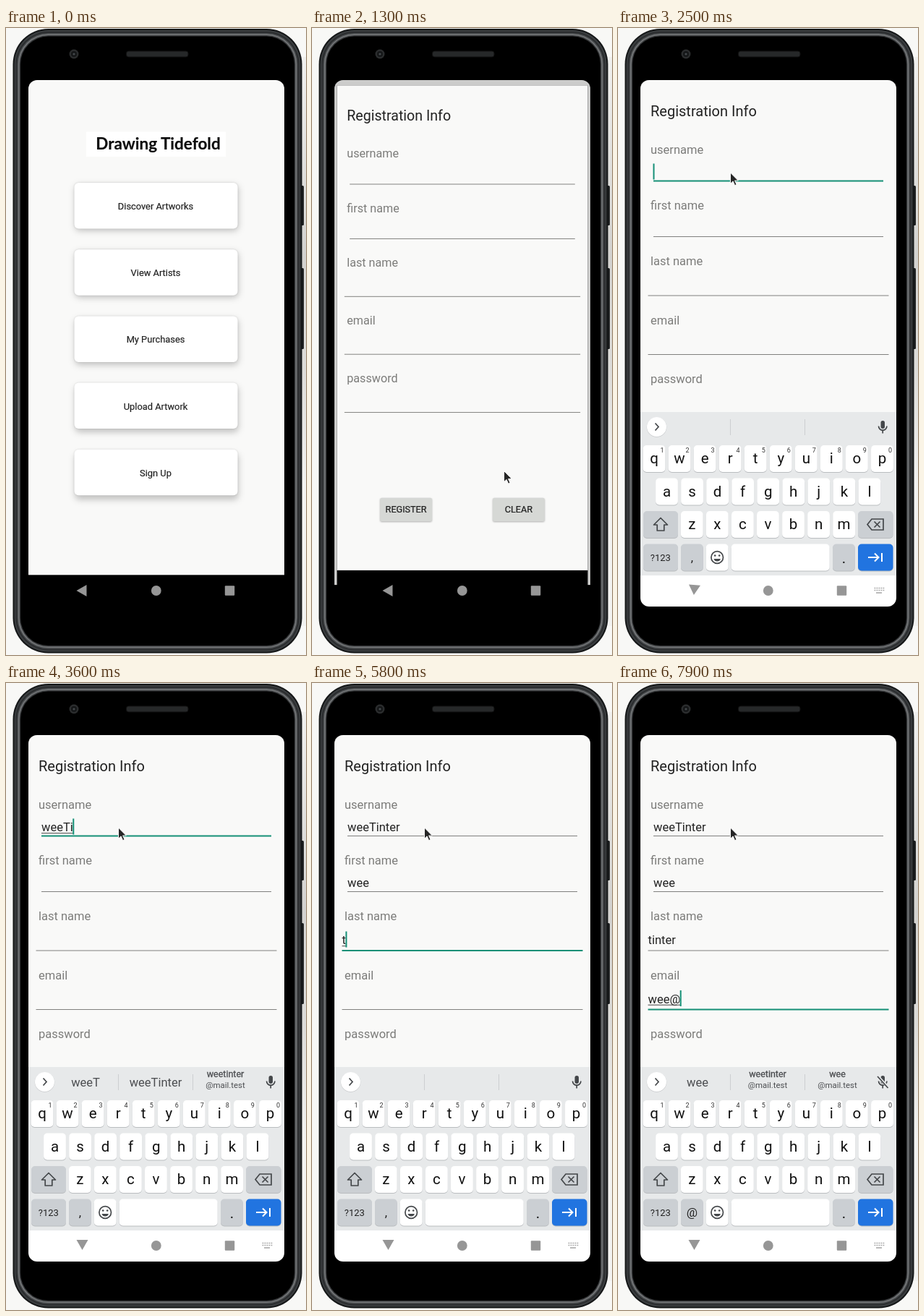
An HTML page that plays this animation: 415 by 867 pixels, repeating every 8 s.

```html
<!DOCTYPE html>
<html lang="en">
<head>
<meta charset="utf-8">
<title>Sign up</title>
<style>
html, body { margin: 0; width: 100%; height: 100%; overflow: hidden; background: #f8f8f6; }
svg { display: block; width: 415px; height: 867px; }
text { font-family: Roboto, Arial, sans-serif; fill: #222; }
.mid { text-anchor: middle; }
.menu text { font-size: 12.85px; stroke: #222; stroke-width: .2; }
.menu .brand { font: 700 22.5px Lato, sans-serif; fill: #0b0b0b; }
.card { fill: #fff; filter: drop-shadow(1px var(--drop) 5px rgba(0,0,0,.2)) drop-shadow(0 0 1px rgba(0,0,0,.14)); }
.btn { fill: #d6d8d5; filter: drop-shadow(0 1px 1px rgba(0,0,0,.3)); }
.cap { font-size: 12.9px; stroke: #222; stroke-width: .25; }
.head { font-size: 20px; }
.label { font-size: 16.5px; fill: #7c7c7a; }
.typed { font-size: 16.5px; }
.key { font-size: 20.5px; fill: #111; }
.num { font-size: 9px; fill: #333; }
.sug { font-size: 16.5px; fill: #4b4d50; }
.sug .name { font-size: 12.5px; stroke: #4b4d50; stroke-width: .3; }
.sug .host { font-size: 11.4px; }
.icon { fill: none; stroke: #44474a; stroke-width: 1.7; }
</style>
</head>
<body>
<svg viewBox="0 0 415 867" id="stage"></svg>
<script>
const GREEN = '#159077';
const rect = (x, y, w, h, r, fill, more = '') =>
  `<rect x="${x}" y="${y}" width="${w}" height="${h}" rx="${r}" fill="${fill}" ${more}/>`;
const text = (x, y, s, cls, more = '') => `<text x="${x}" y="${y}" class="${cls}" ${more}>${s}</text>`;
const path = (d, more = 'class="icon"') => `<path d="${d}" ${more}/>`;

// Form fields: label, label baseline, line left, line right, line y
const fields = [
  ['username', 174, 49, 367, 211.5],
  ['first name', 251, 49, 367, 288.5],
  ['last name', 328, 41.5, 374.5, 370],
  ['email', 409.5, 41.5, 374.5, 451.5],
  ['password', 491, 41.5, 374.5, 533.5]
];

// Body outline shrunk by d pixels on each side
const shell = (d, fill) => rect(9.5 + d, 1 + d, 400 - 2 * d, 863.5 - 2 * d, 49 - d, fill);

function phone() {
  return `<defs>
    <linearGradient id="side" x1="0" x2="0" y1="0" y2="1">
      <stop offset="0" stop-color="#f1f1ef"/><stop offset=".35" stop-color="#d3d2cf"/>
      <stop offset=".55" stop-color="#dddcd9"/><stop offset=".75" stop-color="#f3f3f1"/>
    </linearGradient>
    <clipPath id="screen"><rect x="31" y="72" width="354" height="728" rx="12"/></clipPath></defs>`
    + rect(0, 0, 415, 867, 0, '#f8f8f6') + rect(404, 40, 11, 787, 0, 'url(#side)')
    + rect(406, 218, 6, 55, 1.5, '#1d1f20') + rect(406, 332, 6, 112, 1.5, '#1d1f20')
    + shell(0, '#141617') + shell(2, '#3a3d3f') + shell(4, '#2a2c2e') + shell(6, '#4c4f51')
    + shell(7.5, '#77797b') + shell(9, '#3a3c3e') + shell(10.5, '#000')
    + '<circle cx="94" cy="36" r="6.5" fill="#2b2d2e"/><circle cx="94" cy="36" r="4" fill="#151718"/><circle cx="94" cy="36" r="1.6" fill="#45494c"/>'
    + rect(166.5, 32, 85.5, 8, 3, '#262829', 'stroke="#111"');
}

function menu() {
  const items = ['Discover Artworks', 'View Artists', 'My Purchases', 'Upload Artwork', 'Sign Up'];
  return '<g id="menu" class="menu">' + rect(31, 72, 354, 684.3, 0, '#f9f9f8')
    + rect(111, 143.5, 193, 34.5, 0, '#fff') + text(210.5, 168, 'Drawing Tidefold', 'brand mid')
    + items.map((s, i) => rect(94.5, 214 + i * 92.2, 226, 63.5, 6, '#fff', `class="card" style="--drop:${3 + i * .8}px"`)
      + text(207, 251 + i * 92.2, s, 'mid')).join('')
    + rect(31, 72, 354, 684.3, 0, '#000', 'id="scrim"') + '</g>';
}

function form() {
  return '<g id="form">' + rect(31, 72, 354, 728, 0, '#000') + rect(31, 72, 354, 684.3, 0, '#f9f9f8')
    + text(45, 122, 'Registration Info', 'head')
    + fields.map(([name, y, l, r, ly], i) => text(45, y, name, 'label')
      + `<path id="line${i}" d="M${l} ${ly}H${r}"/>` + text(l, ly - 6.3 - (i > 1) * 2.5, '', 'typed', `id="in${i}"`)).join('')
    + rect(0, 0, 0, 1, 0, '#444', 'id="under"') + rect(0, 0, 2, 22, 0, GREEN, 'id="caret"')
    + rect(92, 654, 73, 33, 2, '', 'class="btn"') + rect(251, 654, 73, 33, 2, '', 'class="btn"')
    + text(128.5, 675.2, 'REGISTER', 'cap mid') + text(287.5, 675.2, 'CLEAR', 'cap mid') + '</g>';
}

function key(x, y, w, fill = '#fff') {
  return rect(x, y + 1, w, 37, 5, '#babdc0') + rect(x, y, w, 37, 5, fill);
}
function keyRow(chars, x, y, nums) {
  return [...chars].map((c, i) => {
    const cx = x + i * 35.05;
    return key(cx - 15.4, y, 30.8) + text(cx, y + 25, c, 'key mid')
      + (nums ? text(cx + 11, y + 10, (i + 1) % 10, 'num mid') : '');
  }).join('');
}
function keyboard() {
  const grey = '#cbcfd3';
  return '<g id="keys">' + rect(31, 531, 354, 226, 0, '#e7e9ea')
    + '<circle cx="53.5" cy="552" r="13.8" fill="#c9cbcd"/><circle cx="53.5" cy="551.5" r="13.5" fill="#fff"/>'
    + path('M51.5 546.5l4.5 5-4.5 5')
    + path('M155.5 541v22M258.5 541v22', 'stroke="#cccfd1"') + '<g id="sug" class="sug"></g>'
    + rect(363.5, 543, 5.5, 11, 2.7, '#44474a') + path('M360.5 550.5a5.7 5.7 0 0 0 11.4 0M366.2 556.5v4')
    + '<g id="mute">' + path('M359.5 544l14 15', 'stroke="#e7e9ea" stroke-width="4"') + path('M359 544l14.5 16') + '</g>'
    + keyRow('qwertyuiop', 50, 577, true) + keyRow('asdfghjkl', 67.5, 622.5) + keyRow('zxcvbnm', 102.3, 668)
    + key(35, 668, 48, grey) + path('M59 677.5l9.5 9.5h-4.7v8h-9.6v-8h-4.7z', 'class="icon" stroke-linejoin="round"')
    + key(332, 668, 48.5, grey) + path('M345 686.5l6-7.5h16v15h-16zM354.5 682.5l8 8m0-8l-8 8')
    + key(35, 713.5, 48, grey) + text(58.8, 737, '?123', 'mid', 'font-size="13"')
    + key(87, 713.5, 30.8, grey) + text(102.5, 738, ',', 'mid', 'id="comma" font-size="17"')
    + key(121.8, 713.5, 30.8) + '<circle cx="137.2" cy="732" r="8.3" class="icon"/>'
    + path('M132.5 734a4.9 4.9 0 0 0 9.4 0z', 'fill="#44474a"')
    + '<circle cx="134.2" cy="729.5" r="1.3" fill="#44474a"/><circle cx="140.2" cy="729.5" r="1.3" fill="#44474a"/>'
    + key(156.7, 713.5, 136) + key(297, 713.5, 30.8, grey) + text(312.5, 740, '.', 'key mid')
    + key(332, 713.5, 48.5, '#2174e0') + path('M346 732h14M355 726.5l5.5 5.5-5.5 5.5M365 726v12', 'fill="none" stroke="#fff" stroke-width="2"')
    + '</g>';
}

function navBar() {
  const dots = [0, 1, 2, 3, 4].map(i => `M${354.5 + i * 3} 774.5h1.8m-1.8 3h1.8`).join('');
  return rect(31, 757, 354, 43, 0, '#fff', 'id="navBg"') + '<g fill="#969696">'
    + path('M97.5 778L111.5 770v16z', 'id="back"') + '<circle cx="207.8" cy="778" r="6.9"/>'
    + rect(302.8, 771.3, 13.4, 13.4, 1, '#969696') + '</g>'
    + path(dots + 'M357 781h8', 'id="hide" fill="none" stroke="#a5a5a5" stroke-width="1.6"');
}

const pointer = path('M0 0v15.2l3.6-3.3 2.5 5.8 2.5-1.1-2.5-5.6h4.8z',
  'id="pointer" fill="#262626" stroke="#fff" stroke-width="1"');
stage.innerHTML = phone() + '<g clip-path="url(#screen)">' + menu() + form() + keyboard() + navBar() + '</g>' + pointer;
const $ = id => document.getElementById(id);

// Typing: time, field, text, suggestions (kept when missing)
const mail = s => s + '|@mail.test';
const full = 'weeTinter', both = [full, mail('weetinter')];
const start = ['we', 'wee', 'me'];
const addresses = ['wee', mail('weetinter'), mail('wee')];
const typing = [
  [2200, 0, '', []], [2700, 0, 'w'], [3100, 0, 'we'], [3200, 0, 'we', start],
  [3400, 0, 'wee', addresses], [3500, 0, 'weeT', addresses], [3600, 0, 'weeTi', ['weeT', ...both]],
  [3800, 0, 'weeTin', ['weeTi', ...both]], [3900, 0, 'weeTint', ['weeTin', ...both]],
  [4100, 0, 'weeTinte', ['weeTint', ...both]], [4400, 0, full, ['weeTinte', ...both]],
  [4500, 1, '', []], [4900, 1, 'w'], [5000, 1, 'we', start], [5300, 1, 'wee', addresses],
  [5400, 2, '', []], [5800, 2, 't'], [6100, 2, 't', ['t', 'to', 'the']],
  [6300, 2, 'ti', ['ti', 'tin', 'time']], [6400, 2, 'tin', ['tin', 'tint', 'tiny']],
  [6500, 2, 'tinte', ['tint', 'tinter', 'Tint']], [6600, 2, 'tinter', ['tinte', 'tinter', 'Tinte']],
  [6800, 3, '', []], [7100, 3, 'w'], [7200, 3, 'we', start], [7500, 3, 'wee', addresses], [7900, 3, 'wee@']
];
// Pointer: time, x, y
const moves = [
  [300, 313, 593], [400, 289, 603], [500, 271, 610], [600, 265.5, 612.5],
  [1400, 262, 596], [1500, 243, 470], [1600, 216.5, 331],
  [1800, 184, 262], [1900, 161, 212], [2000, 155.5, 200]
];
// Screen change: time, form scale, form opacity, menu scale, scrim
const opening = [
  [0, 1, 0, 1, 0], [1200, .93, .5, 1.02, .09], [1300, .98, 1, 1.043, .18],
  [1400, .992, 1, 1.043, .18], [1500, .997, 1, 1.043, .18], [1600, 1, 1, 1, 0]
];
const at = (list, t) => list.filter(e => e[0] <= t).pop();
const set = (id, props) => { for (const k in props) $(id).setAttribute(k, props[k]); };
const zoom = s => `translate(208 436) scale(${s}) translate(-208 -436)`;

function suggestion(s, i) {
  const x = [110, 207, 303.5][i], [a, b] = s.split('|');
  return b ? text(x, 545.3, a, 'sug name mid') + text(x, 560, b, 'sug host mid') : text(x, 558, a, 'sug mid');
}

function draw(t) {
  const [, scale, alpha, old, dim] = at(opening, t);
  set('form', { transform: zoom(scale), opacity: alpha });
  set('menu', { transform: zoom(old) });
  set('scrim', { opacity: dim });

  const spot = at(moves, t);
  set('pointer', { opacity: spot ? 1 : 0, transform: spot ? `translate(${spot[1]} ${spot[2]})` : '' });

  const rise = Math.min(1, Math.max(0, (t - 2200) / 300)), left = (1 - rise) ** 2;
  set('keys', { transform: `translate(0 ${left * 270})`, opacity: rise > 0 ? 1 : 0 });
  set('navBg', { opacity: rise });
  set('hide', { opacity: rise });
  const turn = t >= 2700 ? 1 : rise * .95;
  set('back', { transform: `translate(${turn} ${-turn}) rotate(${-90 * turn} 104.5 778)` });

  const done = typing.filter(e => e[0] <= t), now = done[done.length - 1];
  const active = now ? now[1] : -1;
  fields.forEach(([, , l, , ly], i) => {
    const last = done.filter(e => e[1] === i).pop(), on = i === active;
    $('in' + i).textContent = last ? last[2] : '';
    set('line' + i, { stroke: on ? GREEN : '#80807e', 'stroke-width': on ? 2 : 1 });
    if (!on) return;
    const w = last[2] ? $('in' + i).getComputedTextLength() : 0;
    const top = ly - (i > 1 ? 26.5 : 24);
    set('caret', { x: l + w - .5, y: top });
    set('under', { x: l, y: top + 19.7, width: w });
  });
  set('caret', { opacity: now ? 1 : 0 });
  set('under', { opacity: now ? 1 : 0 });

  const hints = done.filter(e => e[3]).pop();
  $('sug').innerHTML = hints ? hints[3].map(suggestion).join('') : '';
  const email = active === 3;
  set('mute', { opacity: email ? 1 : 0 });
  $('comma').textContent = email ? '@' : ',';
}

let begin, shown;
function tick(ms) {
  begin ??= ms;
  const t = Math.floor((ms - begin) % 8000 / 100) * 100;
  if (t !== shown) draw(shown = t);
  requestAnimationFrame(tick);
}
draw(0);
requestAnimationFrame(tick);
</script>
</body>
</html>
```
